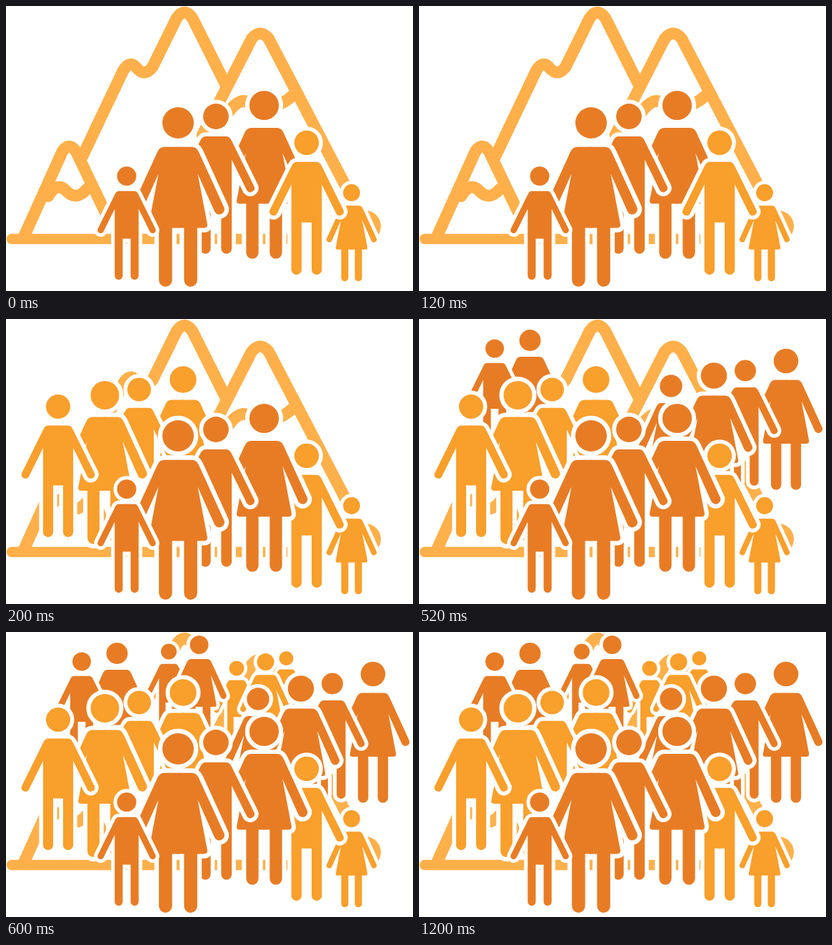
Write an HTML page that moves like this. It is 570 px wide and 400 px high and loops after 1.6 s.

```html
<!DOCTYPE html>
<html lang="en">
<head>
<meta charset="utf-8">
<title>Growing crowd</title>
<style>
  html, body { margin: 0; width: 100%; height: 100%; overflow: hidden; background: #fff; }
  svg { display: block; width: 570px; height: 400px; }
  .mountains { fill: none; stroke: #ffb04a; stroke-width: 16.5; stroke-linecap: round; stroke-linejoin: round; }
  .dark { fill: #e77c25; }
  .light { fill: #f99f2b; }
  .outline { fill: #fff; stroke: #fff; stroke-linejoin: round; }
  .opening, .second, .third, .fourth { animation: 1600ms step-end infinite; }
  .opening { animation-name: opening; }
  .second { animation-name: second; }
  .third { animation-name: third; }
  .fourth { animation-name: fourth; }
  @keyframes opening { 0% { visibility: visible } 12.5%, 100% { visibility: hidden } }
  @keyframes second { 0% { visibility: hidden } 12.5%, 100% { visibility: visible } }
  @keyframes third { 0% { visibility: hidden } 25%, 100% { visibility: visible } }
  @keyframes fourth { 0% { visibility: hidden } 37.5%, 100% { visibility: visible } }
</style>
</head>
<body>
<svg viewBox="0 0 570 400">
  <defs>
    <!-- Half figures, measured in head radii from the head's centre -->
    <path id="manHalf" d="M-.05 1.56H.8Q1.07 1.56 1.22 1.88L3 5.5A.33 .33 0 0 1 2.42 5.8L1.24 3.4V10.35A.415 .415 0 0 1 .41 10.35V6.5H-.05Z"/>
    <path id="womanHalf" d="M-.05 1.53H.88Q1.17 1.53 1.32 1.86L2.91 5.35A.33 .33 0 0 1 2.33 5.67L1.25 3.25L1.86 6.45Q1.9 6.7 1.66 6.7H1.22V10.03A.42 .42 0 0 1 .38 10.03V6.7H-.05Z"/>
    <g id="man"><circle r="1"/><use href="#manHalf"/><use href="#manHalf" transform="scale(-1 1)"/></g>
    <g id="woman"><circle r="1"/><use href="#womanHalf"/><use href="#womanHalf" transform="scale(-1 1)"/></g>
  </defs>
  <g class="mountains">
    <path d="M8 327H392" stroke-width="14.5"/>
    <path d="M25 324L79 204Q88 190 98 204L143 298"/>
    <path d="M59 267Q71 247 83 258Q98 275 113 257"/>
    <path d="M107 211L164 91Q173 75 183 87Q194 100 205 86L239 17Q250 1 261 17L308 111"/>
    <path d="M275 181L344 46Q356 31 368 46L482 265"/>
    <path d="M311 150Q326 128 340 135Q376 151 402 125"/>
  </g>
  <circle fill="#ffb04a" cx="503" cy="309" r="22"/>
  <g id="crowd"></g>
</svg>
<script>
  const NS = 'http://www.w3.org/2000/svg';
  const crowd = document.getElementById('crowd');

  function add(parent, tag, attributes) {
    const node = document.createElementNS(NS, tag);
    for (const name in attributes) node.setAttribute(name, attributes[name]);
    return parent.appendChild(node);
  }

  function person(kind, x, y, r, tone, stage) {
    const group = add(crowd, 'g', { class: stage });
    const transform = `translate(${x} ${y}) scale(${r})`;
    const href = '#' + kind;
    add(group, 'use', { href, transform, class: 'outline', 'stroke-width': (6 + 0.3 * r) / r });
    add(group, 'use', { href, transform, class: tone });
  }

  // Back to front: kind, head centre, head radius, tone, stage of arrival
  [
    ['man', 392.5, 37, 10, 'light', 'fourth'],
    ['man', 323, 51, 10.5, 'light', 'fourth'],
    ['woman', 363.5, 42, 12, 'light', 'fourth'],
    ['man', 228, 27.5, 11, 'dark', 'fourth'],
    ['woman', 270.5, 18, 13, 'dark', 'fourth'],
    ['woman', 155.5, 30, 15, 'dark', 'third'],
    ['man', 106, 41.5, 13, 'dark', 'third'],
    ['woman', 514, 59, 17.3, 'dark', 'third'],
    ['man', 457, 72.5, 15, 'dark', 'third'],
    ['woman', 353, 94, 15.7, 'dark', 'third'],
    ['woman', 413, 79.5, 18.3, 'dark', 'third'],
    ['woman', 248, 85, 18.7, 'light', 'second'],
    ['man', 186.5, 99, 16.5, 'light', 'second'],
    ['woman', 138.5, 107, 20, 'light', 'second'],
    ['man', 73, 123, 17, 'light', 'second'],
    ['woman', 484, 262, 11.9, 'light', ''],
    ['man', 421, 192, 17.2, 'light', 'second'],
    ['woman', 361.5, 139.5, 20.6, 'dark', ''],
    ['man', 294, 155, 17.9, 'dark', ''],
    ['man', 421, 192, 17.2, 'light', 'opening'],
    ['woman', 241, 164, 22, 'dark', ''],
    ['man', 169, 238.8, 13.5, 'dark', '']
  ].forEach(figure => person(...figure));
</script>
</body>
</html>
```
